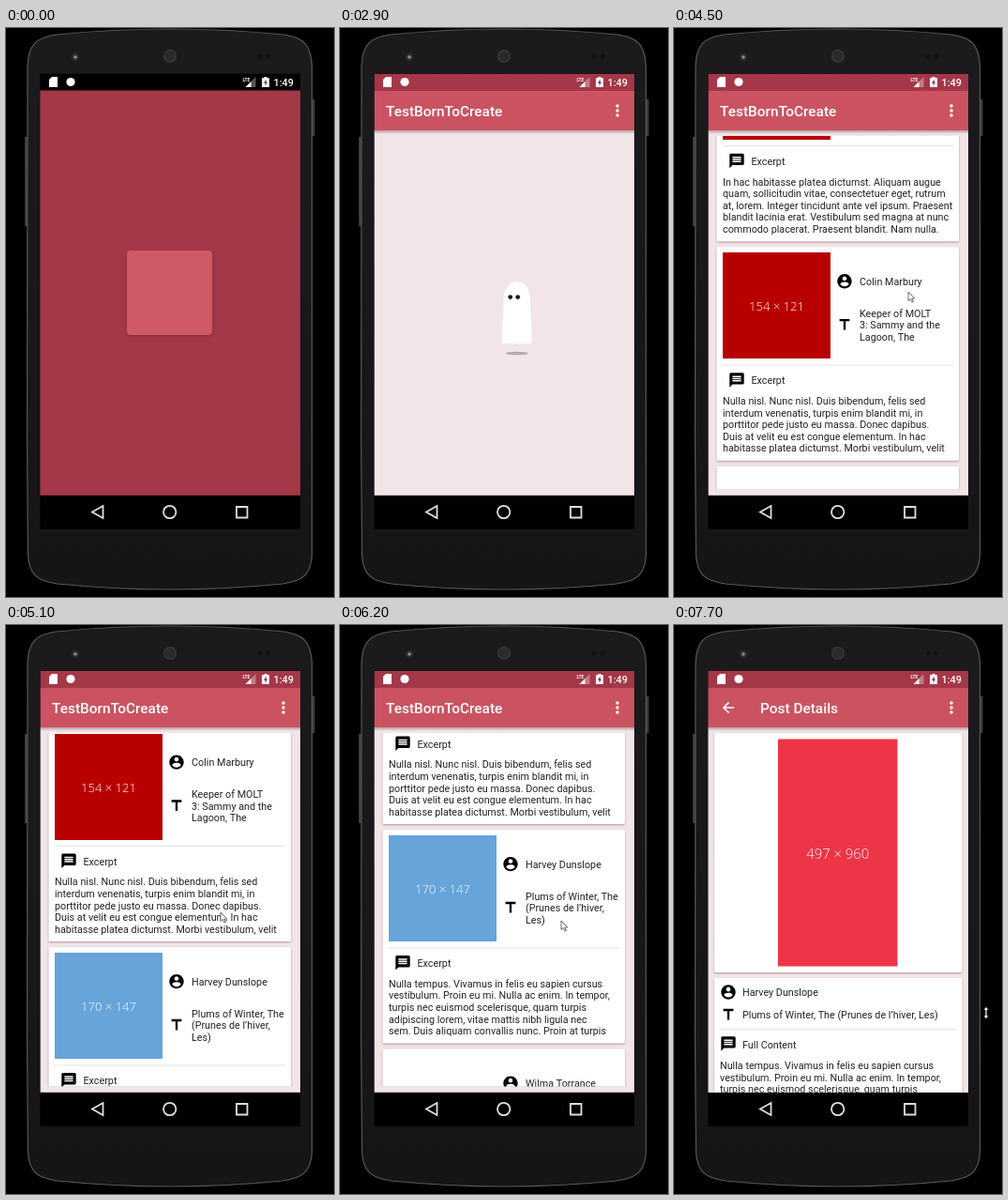
An HTML page with a canvas for the animation above (8000 ms loop, 350x606 px).

```html
<!DOCTYPE html>
<html lang="en">
<head>
<meta charset="utf-8">
<title>Phone demo</title>
<style>
  html, body { margin: 0; width: 100%; height: 100%; overflow: hidden; background: #000; }
  canvas { display: block; }
</style>
</head>
<body>
<canvas id="stage" width="350" height="606"></canvas>
<script>
const ctx = document.getElementById('stage').getContext('2d');
const LOOP = 8000, STEP = 100;
const SPLASH_END = 1500, LIST_START = 3000, DETAIL_START = 6500;
const INK = '#222', DARK_RED = '#a43748', TOOLBAR = '#cb5361', PAPER = '#f2e5e8';
const LEFT = 36.4, WIDTH = 277.6, TOP = 48.7, BOTTOM = 497.8;
const LINE = 12.55, FIRST_CARD = 118, CARD_PITCH = 233.5;

const ICONS = {
  person: 'M12 2C6.48 2 2 6.48 2 12s4.48 10 10 10 10-4.48 10-10S17.52 2 12 2zm0 3c1.66 0 3 1.34 3 3s-1.34 3-3 3-3-1.34-3-3 1.34-3 3-3zm0 14.2c-2.5 0-4.71-1.28-6-3.22.03-1.99 4-3.08 6-3.08 1.99 0 5.97 1.09 6 3.08-1.29 1.94-3.5 3.22-6 3.22z',
  title: 'M5 4v3h5.5v12h3V7H19V4z',
  message: 'M20 2H4c-1.1 0-2 .9-2 2v18l4-4h14c1.1 0 2-.9 2-2V4c0-1.1-.9-2-2-2zm-2 12H6v-2h12v2zm0-3H6V9h12v2zm0-3H6V6h12v2z',
  back: 'M20 11H7.83l5.59-5.59L12 4l-8 8 8 8 1.41-1.41L7.83 13H20v-2z'
};

const POSTS = [
  { author: 'Nolan Petrick', title: ['Orchard of Glass', '(Verger, Le)'], color: '#b90000', size: '154 × 121', loadedAt: LIST_START,
    text: ['In hac habitasse platea dictumst. Aliquam augue', 'quam, sollicitudin vitae, consectetuer eget, rutrum',
      'at, lorem. Integer tincidunt ante vel ipsum. Praesent', 'blandit lacinia erat. Vestibulum sed magna at nunc',
      'commodo placerat. Praesent blandit. Nam nulla.'] },
  { author: 'Colin Marbury', title: ['Keeper of MOLT', '3: Sammy and the', 'Lagoon, The'], color: '#b90000', size: '154 × 121', loadedAt: LIST_START,
    text: ['Nulla nisl. Nunc nisl. Duis bibendum, felis sed', 'interdum venenatis, turpis enim blandit mi, in',
      'porttitor pede justo eu massa. Donec dapibus.', 'Duis at velit eu est congue elementum. In hac',
      'habitasse platea dictumst. Morbi vestibulum, velit'] },
  { author: 'Harvey Dunslope', title: ['Plums of Winter, The', '(Prunes de l’hiver,', 'Les)'], color: '#66a4da', size: '170 × 147', loadedAt: 4700,
    text: ['Nulla tempus. Vivamus in felis eu sapien cursus', 'vestibulum. Proin eu mi. Nulla ac enim. In tempor,',
      'turpis nec euismod scelerisque, quam turpis', 'adipiscing lorem, vitae mattis nibh ligula nec',
      'sem. Duis aliquam convallis nunc. Proin at turpis'] },
  { author: 'Wilma Torrance', title: ['Lantern Street'], loadedAt: Infinity, text: [] }
];

// time, pointer x, pointer y, list scroll
const POINTER = [
  [3600, 258, 399, 0], [4300, 250, 281, 118.3], [4500, 250, 281, 118.3],
  [4700, 236, 430, 118.3], [5100, 229, 306, 242], [5300, 229, 306, 242],
  [5600, 240, 440, 242], [6100, 236, 315, 367], [6700, 236, 315, 367],
  [7100, 300, 380, 367], [7500, 333, 413, 367]
];

function pointerAt(t) {
  const next = POINTER.findIndex(k => k[0] > t);
  if (next === 0) return POINTER[0].slice(1);
  if (next < 0) return POINTER.at(-1).slice(1);
  const a = POINTER[next - 1], b = POINTER[next];
  const u = (t - a[0]) / (b[0] - a[0]), eased = u * u * (3 - 2 * u);
  return [1, 2, 3].map(i => a[i] + (b[i] - a[i]) * eased);
}

function rect(x, y, w, h, color) {
  ctx.fillStyle = color;
  ctx.fillRect(x, y, w, h);
}

function oval(x, y, rx, ry, color) {
  ctx.fillStyle = color;
  ctx.beginPath();
  ctx.ellipse(x, y, rx, ry, 0, 0, 2 * Math.PI);
  ctx.fill();
}

function text(str, x, y, { size = 10.77, weight = 400, color = INK, family = 'Roboto', align = 'left' } = {}) {
  ctx.font = `${weight} ${size}px "${family}", sans-serif`;
  ctx.fillStyle = color;
  ctx.textAlign = align;
  ctx.fillText(str, x, y);
}

function lines(list, x, y) {
  list.forEach((str, i) => text(str, x, y + i * LINE));
}

function shape(path, x, y, { scale = 1, fill, stroke, width = 1 }) {
  const p = new Path2D(path);
  ctx.save();
  ctx.translate(x, y);
  ctx.scale(scale, scale);
  if (fill) { ctx.fillStyle = fill; ctx.fill(p); }
  if (stroke) { ctx.strokeStyle = stroke; ctx.lineWidth = width; ctx.stroke(p); }
  ctx.restore();
}

function icon(name, cx, cy, fill = '#000') {
  shape(ICONS[name], cx - 9.24, cy - 9.24, { scale: 0.77, fill });
}

function panel(x, y, w, h, color = '#fff', radius = 1.5) {
  ctx.save();
  ctx.shadowColor = 'rgba(70,30,40,.4)';
  ctx.shadowBlur = 2.5;
  ctx.shadowOffsetY = 1;
  ctx.fillStyle = color;
  ctx.beginPath();
  ctx.roundRect(x, y, w, h, radius);
  ctx.fill();
  ctx.restore();
}

function clipped(x, y, w, h, draw) {
  ctx.save();
  ctx.beginPath();
  ctx.rect(x, y, w, h);
  ctx.clip();
  draw();
  ctx.restore();
}

function placeholder(x, y, w, h, color, label, size) {
  rect(x, y, w, h, color);
  text(label, x + w / 2, y + h / 2 + size * 0.43, { size, weight: 300, color: '#fff', family: 'Open Sans', align: 'center' });
}

function drawPhone() {
  rect(0, 0, 350, 606, '#000');
  rect(20, 116, 5, 95, '#3f3d40');
  rect(325.5, 76, 4, 39, '#3f3d40');
  const body = ctx.createLinearGradient(0, 0, 0, 606);
  body.addColorStop(0, '#1c1a1d');
  body.addColorStop(1, '#161417');
  shape('M23 40C24 18 32 10 54 7Q175-5 296 7C318 10 325 18 326.5 40V562C325 582 317 589 295 592Q175 604 55 592C33 589 25 582 23.5 562L22.5 440Z',
    0, 0, { fill: body, stroke: '#59575a', width: 1.2 });
  oval(175, 30, 7, 7, '#39373a');
  oval(175, 30, 5.5, 5.5, '#2b292c');
  oval(74, 31, 4.2, 4.2, '#2c2a2e');
  oval(74, 31, 1.8, 1.8, '#8f8d92');
  oval(271, 30, 2.5, 2.5, '#111');
  oval(280, 30, 2.5, 2.5, '#111');
  rect(LEFT, TOP, WIDTH, 534 - TOP, '#000');
}

function drawSplash() {
  rect(LEFT, 66.5, WIDTH, BOTTOM - 66.5, DARK_RED);
  panel(129, 237, 91, 90, '#cf5966', 4);
}

function drawStatusIcons() {
  shape('M3 0H9V11H0V3Z', 46, 52, { fill: '#fff' });
  oval(69, 57.5, 4.6, 4.6, '#fff');
  text('LTE', 252.5, 56.5, { size: 4.8, weight: 700, color: '#fff' });
  shape('M11 0V11H0Z', 255.5, 52, { fill: 'rgba(255,255,255,.35)' });
  shape('M6 5V11H0Z', 255.5, 52, { fill: '#fff' });
  shape('M2.5 0H5.5V1.2H8V11H0V1.2H2.5Z', 273, 52, { fill: '#fff' });
  shape('M4.6 2.6L2 6.8H3.6V9.8L6 5.6H4.6Z', 273, 52, { fill: '#8a2a3a' });
  text('1:49', 285.5, 62, { size: 10.8, weight: 500, color: '#fff' });
}

function drawNavIcons() {
  const pen = { stroke: '#dedede', width: 1.8 };
  shape('M103.5 509V522L92 515.5Z', 0, 0, pen);
  shape('M168 515.5a6.7 6.7 0 1 0 13.4 0a6.7 6.7 0 1 0-13.4 0Z', 0, 0, pen);
  shape('M246 510H257.5V521.5H246Z', 0, 0, pen);
}

function drawWindow(title, withBack) {
  rect(LEFT, 109, WIDTH, BOTTOM - 109, PAPER);
  const shade = ctx.createLinearGradient(0, 109, 0, 113);
  shade.addColorStop(0, 'rgba(90,50,60,.4)');
  shade.addColorStop(1, 'rgba(90,50,60,0)');
  rect(LEFT, 109, WIDTH, 4, shade);
  rect(LEFT, TOP, WIDTH, 67 - TOP, DARK_RED);
  rect(LEFT, 67, WIDTH, 42, TOOLBAR);
  if (withBack) icon('back', 58, 88, '#fff');
  text(title, withBack ? 92 : 49, 94, { size: 15.4, weight: 500, color: '#fff' });
  for (const y of [83, 88, 93]) oval(296, y, 1.7, 1.7, '#fff');
}

function drawGhost(t) {
  const phase = (t - 1270) / 1500 % 2;
  const goingRight = phase < 1;
  const x = 159.5 + 32 * (goingRight ? phase : 2 - phase);
  const lift = (1 + Math.cos((t - 1500) / 2800 * 6 * Math.PI)) / 2;
  const y = 270 - 6 * lift;
  oval(x, 346.5, 12 + 2 * lift, 1.7, '#b5a9ac');
  shape('M-16 64L-14 17C-13-5.5 13-5.5 14 17L16 64Q14 68 11.5 65Q8.5 68 6 65Q3 68 0 65Q-3 68-6 65Q-8.5 68-11.5 65Q-14 68-16 64Z', x, y, { fill: '#fff' });
  const gaze = goingRight ? 3 : -3;
  for (const side of [-4, 4]) oval(x + gaze + side, y + 16.6, 2.4, 2.4, '#1c1c1c');
}

function drawPost(post, y, t) {
  panel(45.5, y, 258.5, 227.5);
  if (t >= post.loadedAt) placeholder(52, Math.round(y + 6), 115, 113, post.color, post.size, 13.1);
  icon('person', 182, y + 36.6);
  text(post.author, 198, y + 40.9);
  icon('title', 182, y + 83);
  lines(post.title, 198, y + 74.6 + (3 - post.title.length) * LINE / 2);
  rect(52, y + 125.5, 246, 0.8, '#ddd');
  icon('message', 67, y + 141.8);
  text('Excerpt', 82.5, y + 146);
  lines(post.text, 52, y + 167.9);
}

function drawMain(t, scroll) {
  drawWindow('TestBornToCreate', false);
  if (t < LIST_START) return drawGhost(t);
  clipped(LEFT, 115, WIDTH, 376.5, () =>
    POSTS.forEach((post, i) => drawPost(post, FIRST_CARD + i * CARD_PITCH - scroll, t)));
}

function drawDetail() {
  const post = POSTS[2];
  drawWindow('Post Details', true);
  clipped(LEFT, 112, WIDTH, BOTTOM - 112, () => {
    panel(43, 115, 264.5, 255);
    placeholder(111, 121.5, 127.5, 242, '#ee3447', '497 × 960', 14.8);
    panel(43, 376, 264.5, 140);
    icon('person', 58, 391);
    text(post.author, 73, 395.3);
    icon('title', 58, 415);
    text(post.title.join(' '), 73, 419.3);
    rect(49, 430, 252, 0.8, '#ddd');
    icon('message', 58, 446);
    text('Full Content', 73, 450.5);
    lines(post.text, 49, 473);
  });
}

// New windows fade in while settling upwards.
function slideIn(t, start, duration, distance, fromAlpha, draw) {
  const p = Math.min(1, (t - start) / duration);
  clipped(LEFT, TOP, WIDTH, 534 - TOP, () => {
    ctx.globalAlpha = fromAlpha + (1 - fromAlpha) * p;
    ctx.translate(0, distance * (1 - p) ** 2);
    draw();
  });
}

function drawPointer(t, x, y) {
  if (t < POINTER[0][0]) return;
  const resizing = x > 328;
  const path = resizing
    ? 'M0-6.5L3-3H1V3H3L0 6.5-3 3H-1V-3H-3Z'
    : 'M0 0V9.5L2.2 7.5 4 11 5.4 10.4 3.8 7H6.8Z';
  shape(path, x, y, { fill: '#fff', stroke: resizing ? '#111' : '#444', width: 0.8 });
}

function render(t) {
  const [x, y, scroll] = pointerAt(t);
  drawPhone();
  if (t < SPLASH_END + 200) drawSplash();
  if (t >= SPLASH_END) slideIn(t, SPLASH_END, 200, 6, 0.96, () => drawMain(t, scroll));
  if (t >= DETAIL_START) slideIn(t, DETAIL_START, 300, 17, 0.6, drawDetail);
  drawStatusIcons();
  drawNavIcons();
  drawPointer(t, x, y);
}

function tick() {
  render(Math.floor(performance.now() % LOOP / STEP) * STEP);
  requestAnimationFrame(tick);
}
tick();
</script>
</body>
</html>
```
